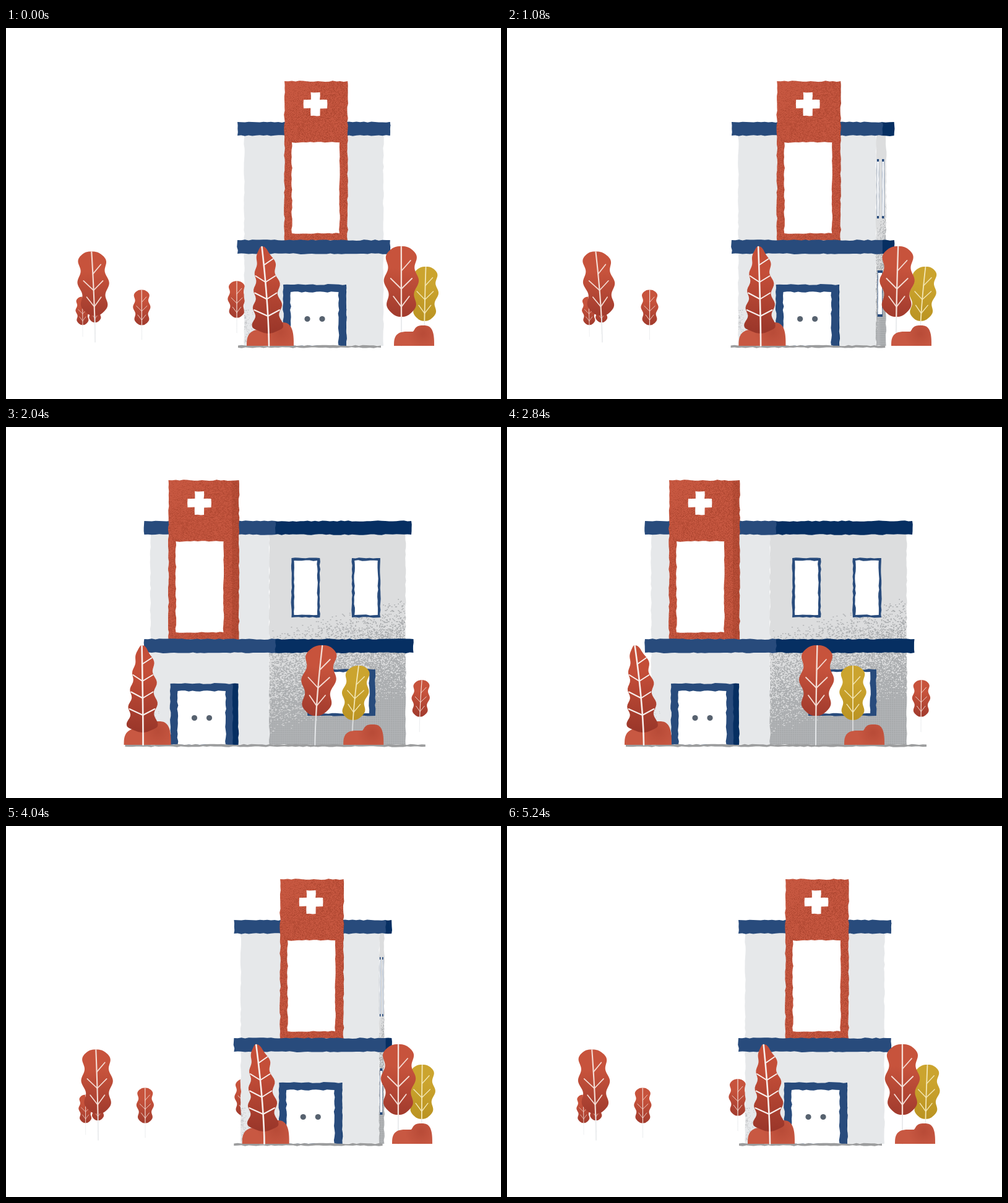
An HTML page with a canvas for the animation above (5.28 s loop, 800 by 600 pixels).

```html
<!DOCTYPE html>
<html lang="en">
<head>
<meta charset="utf-8">
<title>Turning hospital</title>
<style>
html, body { margin: 0; width: 100%; height: 100%; overflow: hidden; background: #fff; }
canvas { display: block; width: 800px; height: 600px; }
</style>
</head>
<body>
<canvas id="stage" width="800" height="600"></canvas>
<script>
const ctx = document.getElementById('stage').getContext('2d');
const LOOP = 5280, SWAY = 1320, GROUND = 514;
const BLUE = '#284b7c', NAVY = '#062f62', WALL = '#e6e8ea', STEM = '#e8eaec';

const clamp = v => Math.max(0, Math.min(1, v));
const mix = (a, b, k) => a + (b - a) * k;
const wave = (v, period) => Math.cos(2 * Math.PI * v / period);

function random(seed) {
  let s = seed * 7919 + 17;
  return () => {
    s = (s + 0x6D2B79F5) | 0;
    let r = Math.imul(s ^ (s >>> 15), 1 | s);
    r = (r + Math.imul(r ^ (r >>> 7), 61 | r)) ^ r;
    return ((r ^ (r >>> 14)) >>> 0) / 4294967296;
  };
}

// Speckled texture: density(x, y) is the chance of a dot
function grain(w, h, base, dot, size, seed, density) {
  const c = document.createElement('canvas');
  c.width = w;
  c.height = h;
  const g = c.getContext('2d'), rnd = random(seed);
  g.fillStyle = base;
  g.fillRect(0, 0, w, h);
  g.fillStyle = dot;
  for (let y = 0; y < h; y += size)
    for (let x = 0; x < w; x += size)
      if (rnd() < density(x, y)) g.fillRect(x, y, size, size);
  return c;
}

const brick = grain(116, 260, '#c65740', 'rgba(150,55,35,.42)', 1, 3,
  (x, y) => 0.4 * clamp((x + y) / 90));
const concrete = grain(222, 342, '#dcddde', '#a5a8aa', 1.5, 5,
  (x, y) => clamp((y - 95 - 60 * (1 - x / 222)) / 170));

// Rectangle path with hand-cut edges
function roughPath(x0, y0, x1, y1, seed, amp = 0.9) {
  const rnd = random(seed);
  const corners = [[x0, y0], [x1, y0], [x1, y1], [x0, y1]];
  ctx.beginPath();
  corners.forEach(([ax, ay], c) => {
    const [bx, by] = corners[(c + 1) % 4];
    const n = Math.max(1, Math.round(Math.hypot(bx - ax, by - ay) / 6));
    for (let i = 0; i < n; i++) {
      const d = i ? (rnd() * 2 - 1) * amp : 0;
      ctx.lineTo(mix(ax, bx, i / n) + (c % 2 ? d : 0), mix(ay, by, i / n) + (c % 2 ? 0 : d));
    }
  });
  ctx.closePath();
}

function rough(x0, y0, x1, y1, color, seed, amp) {
  if (x1 - x0 < 0.3) return;
  roughPath(x0, y0, x1, y1, seed, amp);
  ctx.fillStyle = color;
  ctx.fill();
}

// Leaf kinds: width(h, side) is the half width at height h above the foot
const ROUND = {
  low: 47,
  width(h) {
    const u = (h - 47) / 114;
    return Math.cbrt(1 - Math.abs(2 * u - 1) ** 3) * (23.2 + 3 * u + 3.5 * wave(u - 0.51, 0.37));
  },
  veins: { first: 63, step: 29, left: 2, right: 3, rise: 17, reach: 0.62 },
  line: 1.8, bare: STEM
};
const TALL = {
  low: 20,
  width(h, side) {
    const u = (h - 20) / 141, foot = Math.sqrt(clamp(u / 0.06));
    const taper = side < 0 ? (1 - u) ** 0.45 : Math.sqrt(1 - u ** 5);
    return foot * taper * (side < 0 ? 25 + 2.8 * wave(h - 62, 28) : 21 + 3 * wave(h - 67, 34));
  },
  veins: { first: 48, step: 27.5, left: 3, right: 4, rise: 10, reach: 0.93 },
  line: 2, bare: '#f8efec'
};
const RED = ['#c7533c', '#a33c2e', '#f4ddd5'];
const RUST = ['#c44e38', '#9b372a', '#f8efec'];
const GOLD = ['#cba42e', '#bb9422', '#f3e6b4'];

// The trunk bends from a fixed foot; lean is the shift of the tip in pixels
function tree(kind, [light, dark, vein], x, y, scale, lean) {
  const { low, width, veins, line } = kind, top = 161;
  const at = (dx, h) => [x + dx * scale + lean * (h / top) ** 1.6, y - h * scale];
  const stroke = (color, w, points) => {
    ctx.strokeStyle = color;
    ctx.lineWidth = w * scale;
    ctx.beginPath();
    points.forEach(p => ctx.lineTo(...p));
    ctx.stroke();
  };
  const trunk = (from, to) => Array.from({ length: 13 }, (_, i) => at(0, mix(from, to, i / 12)));
  ctx.lineCap = 'round';
  stroke(kind.bare, line, trunk(0, low + 3));

  ctx.beginPath();
  for (const side of [-1, 1])
    for (let i = 0; i <= 60; i++) {
      const k = (1 - wave(i, 120)) / 2;
      const h = mix(low, top, side < 0 ? k : 1 - k);
      ctx.lineTo(...at(side * width(h, side), h));
    }
  ctx.closePath();
  const shade = ctx.createLinearGradient(...at(6, 150), ...at(0, low + 4));
  shade.addColorStop(0.25, light);
  shade.addColorStop(1, dark);
  ctx.fillStyle = shade;
  ctx.fill();

  for (const side of [-1, 1])
    for (let i = 0; i < (side < 0 ? veins.left : veins.right); i++) {
      const h = veins.first + veins.step * i, tip = h + veins.rise;
      stroke(vein, line, [at(0, h), at(side * veins.reach * width(tip, side), tip)]);
    }
  stroke(vein, line * 1.3, trunk(kind === TALL ? 0 : low, top - 1));
}

// Two overlapping mounds, the right one higher
function shrub(x, w, h) {
  const g = ctx.createRadialGradient(x + w * 0.72, GROUND - h * 0.6, 2, x + w * 0.72, GROUND - h * 0.6, w * 0.4);
  g.addColorStop(0, '#b94c38');
  g.addColorStop(1, '#c85842');
  ctx.fillStyle = g;
  ctx.beginPath();
  for (let i = 0; i <= 60; i++) {
    const u = (1 - wave(i, 120)) / 2;
    const mound = (from, to) => Math.cbrt(Math.max(0, 1 - Math.abs(2 * (u - from) / (to - from) - 1) ** 3));
    ctx.lineTo(x + u * w, GROUND - h * Math.max(0.7 * mound(0, 0.75), mound(0.45, 1)));
  }
  ctx.fill();
}

function pane(x0, y0, x1, y1, seed) {
  const b = 0.09 * (x1 - x0), amp = Math.min(0.8, b / 3);
  rough(x0, y0, x1, y1, BLUE, seed, amp);
  rough(x0 + b, y0 + 4, x1 - b, y1 - 4, '#fff', seed + 1, amp);
}

function sideWall(p, left, right) {
  const w = right - left;
  if (w < 1) return;
  ctx.save();
  roughPath(left, 170, right, GROUND, 21, 0.8);
  ctx.clip();
  ctx.drawImage(concrete, left - 1, 173, w + 2, 342);
  ctx.restore();
  const at = (a, b) => left + w * mix(a, b, p);
  pane(at(0.08, 0.163), 212, at(0.285, 0.371), 308, 31);
  pane(at(0.594, 0.606), 212, at(0.804, 0.814), 308, 33);
  pane(at(0.13, 0.28), 392, at(0.64, 0.778), 467, 35);
}

function roof(p, y, reach, seed) {
  const fold = mix(620.5, 435, p);
  rough(fold - 2, y, mix(620.5, reach, p) + 38 * p * (1 - p), y + 22, NAVY, seed);
  rough(mix(374, 223, p), y, fold, y + 22, BLUE, seed + 1);
}

function tower(p) {
  const x = mix(450, 262, p), fold = mix(552, 365, p), end = mix(552, 376, p);
  ctx.save();
  roughPath(x, 86, end, 344, 51);
  ctx.clip();
  ctx.drawImage(brick, x - 1, 85);
  ctx.fillStyle = 'rgba(120,35,20,.17)';
  ctx.fillRect(fold, 84, end - fold + 2, 262);
  ctx.restore();
  rough(x + 12, 185, x + 89, 332, '#fff', 53);
  const cx = x + 50, cy = 123;
  rough(cx - 19, cy - 7, cx + 19, cy + 7, '#fff', 55, 0.6);
  rough(cx - 7.5, cy - 19, cx + 7.5, cy + 19, '#fff', 56, 0.6);
}

function door(p) {
  const x = mix(448, 265, p), fold = mix(550, 366, p);
  rough(fold - 2, 415, mix(550, 375, p), GROUND, NAVY, 61, 0.8);
  rough(x, 415, fold, GROUND, BLUE, 62);
  rough(x + 12, 427, x + 89.5, GROUND, '#fff', 63);
  ctx.fillStyle = '#57626f';
  for (const dx of [39, 63]) {
    ctx.beginPath();
    ctx.arc(x + dx, 470.5, 4.6, 0, 7);
    ctx.fill();
  }
}

function walls(p) {
  const left = mix(385, 233, p), corner = mix(610, 425, p);
  rough(left, 170, corner, GROUND, WALL, 11, 0.8);
  const rnd = random(13);
  ctx.fillStyle = 'rgba(150,152,154,.35)';
  for (let i = 0; i < 90; i++)
    ctx.fillRect(left + 16 * rnd() * rnd(), 455 + 55 * rnd(), 1.2, 1.2);
  sideWall(p, corner, mix(610, 646, p));
}

// Share of the turn done: 0 front view, 1 corner view
function turn(t) {
  const ease = u => u < 0.5 ? 4 * u ** 3 : 1 - 4 * (1 - u) ** 3;
  return ease(clamp((t - 690) / 1480)) - ease(clamp((t - 2870) / 1480));
}

function draw(t) {
  const p = turn(t), x = (front, corner) => mix(front, corner, p);
  const sway = (mid, amp, start) => mid - amp * wave(t - start, SWAY);
  ctx.fillStyle = '#fff';
  ctx.fillRect(0, 0, 800, 600);

  const soft = sway(-0.5, 1.2, 1000);
  tree(ROUND, RED, x(124, 250), 499, 0.4, soft);
  tree(ROUND, RED, x(144, 268), 495, 0.4, soft);
  tree(ROUND, RED, x(219.5, 369), 504, 0.5, sway(0.5, 0.8, 0));
  tree(ROUND, RED, x(373, 669), 493, 0.52, sway(2, 2, 0));
  tree(ROUND, RED, x(144, 280), 508, 0.91, sway(-5.5, 5.5, 1000));

  walls(p);
  roof(p, 152, 655, 41);
  tower(p);
  roof(p, 343, 658.5, 44);
  door(p);
  rough(x(375, 192), 513.5, x(606, 678), 517, '#9c9d9e', 71, 0.8);

  shrub(x(389, 190), 76, 38);
  tree(TALL, RUST, x(425, 221), GROUND, 1, sway(-7.5, 7, 200));
  tree(ROUND, GOLD, x(676, 559), 510, 0.77, sway(6, 6, 200));
  tree(ROUND, RED, x(639, 499), GROUND, 1, sway(6, 6.2, 0));
  shrub(x(627, 545), 65, 33);
}

// Pictures are held for 80 ms
const hold = t => t < 80 ? 0 : t < 120 ? 80 : Math.floor((t - 40) / 80) * 80 + 40;

let shown = -1;
const begin = performance.now();
function tick() {
  const t = hold((performance.now() - begin) % LOOP);
  if (t !== shown) draw(shown = t);
  requestAnimationFrame(tick);
}
tick();
</script>
</body>
</html>
```
